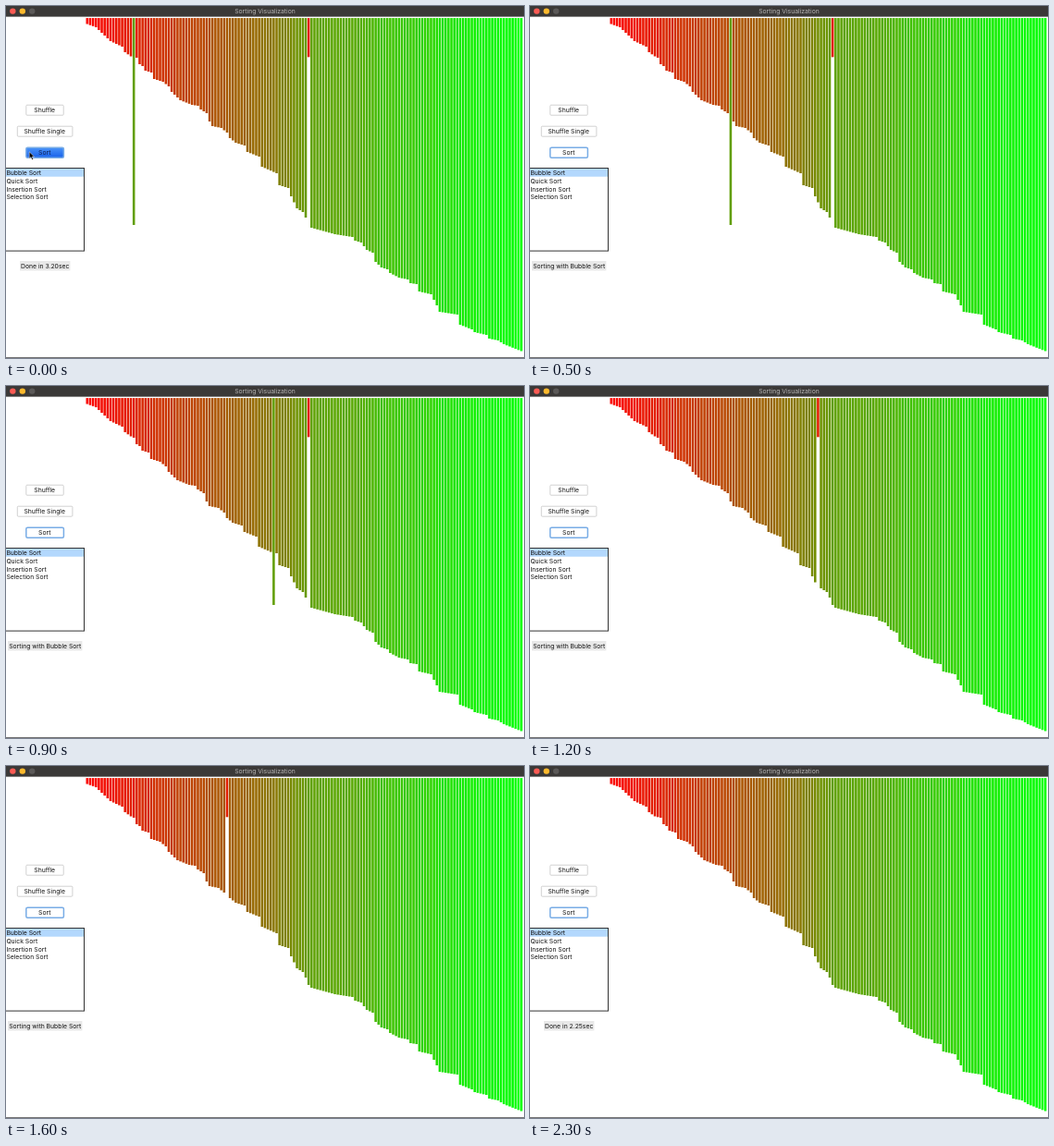
Animation of 560 by 381 pixels, one loop 2.4 s. Source, as an HTML page:

```html
<!DOCTYPE html>
<html lang="en">
<head>
<meta charset="utf-8">
<title>Sorting Visualization</title>
<style>
  html, body { margin: 0; width: 100%; height: 100%; overflow: hidden; background: #fff; }
  svg { display: block; width: 560px; height: 381px; }
  text { font: 6.8px Inter, "Liberation Sans", sans-serif; fill: #111; }
  .mid { text-anchor: middle; }
  .button { fill: #fff; stroke: #c6c6c6; stroke-width: .8; }
</style>
</head>
<body>
<svg viewBox="0 0 560 381">
  <defs>
    <linearGradient id="pressed" x2="0" y2="1">
      <stop stop-color="#4a93f8"/>
      <stop offset="1" stop-color="#1761ea"/>
    </linearGradient>
  </defs>
  <rect width="560" height="381" fill="#fff"/>
  <g id="bars"></g>

  <rect width="560" height="11.6" fill="#3b3938"/>
  <circle cx="7.3" cy="5.6" r="3.2" fill="#fc5b54"/>
  <circle cx="17.8" cy="5.6" r="3.2" fill="#fdb92d"/>
  <circle cx="28.2" cy="5.6" r="3.2" fill="#5b5958"/>
  <text class="mid" x="280" y="8" style="fill:#b8b6b5">Sorting Visualization</text>
  <rect y="380" width="560" height="1" fill="#777"/>

  <rect class="button" x="21.8" y="107.2" width="40.4" height="11" rx="1"/>
  <text class="mid" x="41.7" y="115.2">Shuffle</text>
  <rect class="button" x="12.3" y="130.2" width="59.6" height="11" rx="1"/>
  <text class="mid" x="41.7" y="138.2">Shuffle Single</text>
  <rect id="sort" x="21.8" y="153.2" width="40.6" height="11" rx="1.5" stroke="#78ace6" stroke-width="1.5"/>
  <text id="sortText" class="mid" x="41.7" y="161.2">Sort</text>

  <rect x="-2" y="175.5" width="86.5" height="89.6" fill="#fff" stroke="#333" stroke-width="1"/>
  <rect y="176" width="84" height="8.7" fill="#b3d8fd"/>
  <g id="list"></g>

  <rect id="statusBox" y="276" height="10.4" fill="#e8e8e8"/>
  <text id="status" class="mid" x="42.2" y="283.6"></text>
  <path id="cursor" d="M25.2 157.8v7.4l1.7-1.6 1.3 2.9 1.3-.6-1.3-2.8h2.3z"
        fill="#000" stroke="#fff" stroke-width=".5"/>
</svg>
<script>
const LOOP = 2400, STEP = 100;
const COUNT = 150, LEFT = 86.2, PITCH = 3.15, TOP = 13, BOTTOM = 373.5;
const LOW = 16, HIGH = 76;   // the two bars that start out exchanged

// Lower edge of the sorted bars: [bar, y], straight between points.
const outline = [
  [0, 19.5], [3, 23], [8, 38], [12, 44], [13, 50], [15, 54.5], [17, 56], [18, 63], [19, 65],
  [20, 70], [22, 72], [23, 79], [26, 82], [28, 87], [29, 93], [32, 102], [36, 107], [38, 108],
  [39, 112], [41, 116], [42, 125], [43, 130], [46, 132], [48, 137], [49, 143], [51, 148],
  [54, 151], [55, 158], [59, 163], [60, 174], [65, 181], [66, 194], [69, 197], [70, 206],
  [72, 219], [74, 223], [75, 229], [76, 237], [77, 240], [85, 247], [91, 250], [92, 254],
  [94, 256], [96, 264], [98, 267], [99, 277], [101, 283], [103, 285], [104, 289], [107, 294],
  [110, 296], [111, 300], [113, 301], [114, 309], [118, 312], [120, 324], [121, 331],
  [127, 334], [128, 345], [132, 350], [133, 353], [137, 356], [138, 360], [141, 362],
  [143, 366], [149, 373.5]
];

const byId = id => document.getElementById(id);

function add(parent, tag, attrs) {
  const node = document.createElementNS("http://www.w3.org/2000/svg", tag);
  for (const key in attrs) node.setAttribute(key, attrs[key]);
  return parent.appendChild(node);
}

function edge(i) {
  const k = Math.max(1, outline.findIndex(p => p[0] >= i));
  const [x0, y0] = outline[k - 1], [x1, y1] = outline[k];
  return y0 + (y1 - y0) * (i - x0) / (x1 - x0);
}

const sorted = Array.from({ length: COUNT }, (_, i) => edge(i));
const bars = sorted.map((_, i) => add(byId("bars"), "rect", {
  x: (LEFT + PITCH * i + .3).toFixed(2), y: TOP, width: 2.55
}));

["Bubble Sort", "Quick Sort", "Insertion Sort", "Selection Sort"].forEach((name, i) => {
  add(byId("list"), "text", { x: .4, y: 182.7 + 8.9 * i }).textContent = name;
});

// The tall bar climbs to its place, then the short one sinks back to its own.
function arrange(step) {
  const order = sorted.slice();
  const move = (from, to) => order.splice(to, 0, order.splice(from, 1)[0]);
  if (step < 12) {
    const at = step ? Math.round(29 + 5.75 * (step - 3)) : LOW;
    [order[LOW], order[HIGH]] = [order[HIGH], order[LOW]];
    move(LOW, Math.min(at, HIGH - 1));
  } else if (step < 23) {
    const at = step < 16 ? 71 - 5.75 * (step - 12) : 48 - 5 * (step - 16);
    move(LOW, Math.round(at));
  }
  return order;
}

function draw(step) {
  arrange(step).forEach((y, i) => {
    const f = (y - TOP) / (BOTTOM - TOP);
    bars[i].setAttribute("height", (y - TOP).toFixed(1));
    bars[i].setAttribute("fill", `rgb(${Math.round(255 * (1 - f))},${Math.round(255 * f)},0)`);
  });

  const pressed = step === 0, busy = step > 0 && step < 23;
  byId("sort").setAttribute("fill", pressed ? "url(#pressed)" : "#fff");
  byId("sortText").style.fill = pressed ? "#0b1c50" : "#111";
  byId("cursor").style.display = pressed ? "" : "none";
  byId("status").textContent = busy ? "Sorting with Bubble Sort"
    : `Done in ${pressed ? "3.20" : "2.25"}sec`;
  byId("statusBox").setAttribute("x", busy ? 2 : 15);
  byId("statusBox").setAttribute("width", busy ? 80.4 : 54.4);
}

const start = performance.now();
let shown = -1;
function tick() {
  const step = Math.floor((performance.now() - start) % LOOP / STEP);
  if (step !== shown) draw(shown = step);
  requestAnimationFrame(tick);
}
tick();
</script>
</body>
</html>
```
